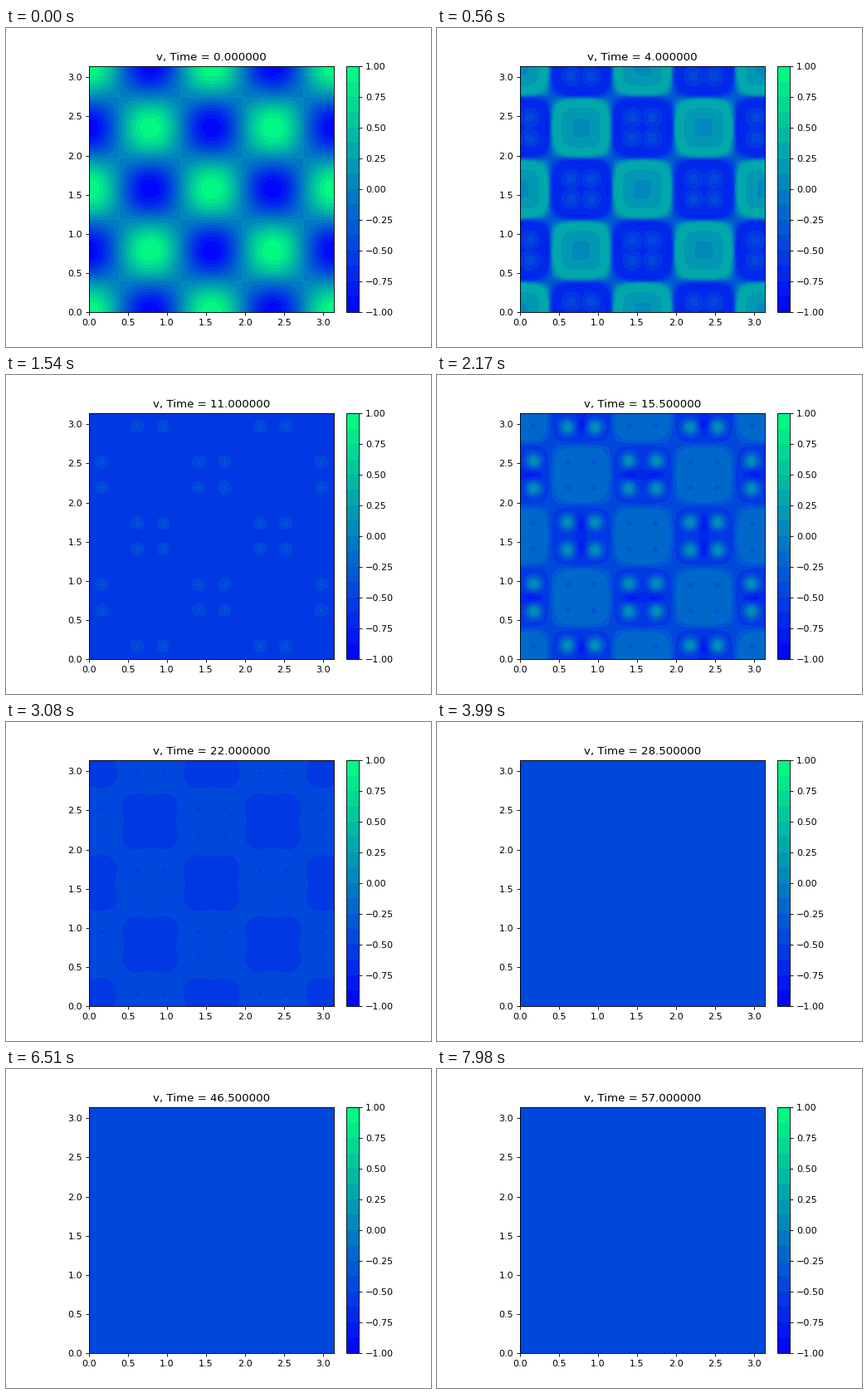
Recreate the animation shown at these times as a matplotlib script. Size 512 by 384 pixels, loop 8000 ms.

```python
import numpy as np
import matplotlib.pyplot as plt
from matplotlib.animation import FuncAnimation
from mpl_toolkits.axes_grid1 import make_axes_locatable

plt.rcParams["font.family"] = "DejaVu Sans"

LOOP, TICK, STEP = 8000, 20, 70      # ms
DT = 0.5                             # simulated time per step
LEVELS = np.linspace(-1, 1, 17)

x = np.linspace(0, np.pi, 301)
X, Y = np.meshgrid(x, x)
C = np.cos(4 * X) * np.cos(4 * Y)    # > 0 in "high" cells, < 0 in "low" cells


def local(s):
    """Offset from the nearest cell centre, -1 to 1 across the cell."""
    return ((s * 4 / np.pi + 0.5) % 1 - 0.5) * 2


def bell(d, width):
    return np.exp(-(d / width) ** 2 / 2)


def ramp(s, lo, hi):
    s = np.clip((s - lo) / (hi - lo), 0, 1)
    return s * s * (3 - 2 * s)


def mix(low, high, m):
    return low + (high - low) * m


PX, PY = np.abs(local(X)), np.abs(local(Y))
SQUARE = (PX ** 4 + PY ** 4) ** 0.25
NODE = (np.sin(4 * X) * np.sin(4 * Y)) ** 2


def spots(at, width):
    return bell(PX - at, width) * bell(PY - at, width)


def squares():
    high = 0.09 + 0.38 * np.minimum(SQUARE, 0.95) ** 2
    low = -0.67 + 0.24 * spots(0.33, 0.17) - 0.12 * ramp(SQUARE, 0.6, 0.95)
    edge = 0.5 + 0.5 * np.tanh((C - 0.05) / 0.12)
    return mix(low, high, edge) + 0.1 * NODE ** 3


def reversed_squares():
    high = -0.85 - 0.04 * bell(PX + PY - 0.58, 0.05)
    low = -0.2 + 0.13 * spots(0.38, 0.13) - 0.09 * bell(PX + PY, 0.17)
    return mix(low, high, ramp(C, -0.5, 0.05)) + 0.17 * NODE ** 2


def crossing():
    low = -0.62 + 0.25 * spots(0.42, 0.17)
    return mix(low, -0.52, ramp(C, -0.3, 0.2))


def four_spots():
    d = np.hypot(PX - 0.42, PY - 0.42)
    high = -0.23 + 0.07 * bell(d - 0.27, 0.08) - 0.05 * bell(d, 0.12)
    # dark bars lie sideways in every second column of low cells
    even = np.floor(X * 4 / np.pi + 0.5) % 2 == 0
    along, across = np.where(even, PX, PY), np.where(even, PY, PX)
    bars = bell(along - 0.4, 0.2) * bell(across, 0.12)
    low = (-0.58 + 0.72 * spots(0.45, 0.17) - 0.25 * bars
           - 0.06 * bell(np.hypot(PX, PY), 0.25))
    return mix(low, high, ramp(C, -0.2, 0.25))


def clovers():
    def lobes(p):
        return bell(p - 0.47, 0.35) + bell(p + 0.47, 0.35)
    g = lobes(PX) * lobes(PY) * ramp(C, 0, 0.08)
    dots = spots(0.42, 0.08) * (C < 0)
    return -0.5 - 0.08 * (g - 0.433) - 0.05 * dots


def rest():
    return mix(-0.465, -0.497, ramp(C, -0.1, 0.3))


TIMES = np.array([0, 4, 7, 11, 15.5, 22, 24])
KEYS = np.array([C, squares(), reversed_squares(), crossing(),
                 four_spots(), clovers(), rest()])
SLOPES = np.gradient(KEYS, TIMES, axis=0)
SLOPES[-1] = 0


def field(t):
    """Cubic Hermite path through the key states."""
    if t >= TIMES[-1]:
        return KEYS[-1]
    k = np.searchsorted(TIMES, t, side="right") - 1
    h = TIMES[k + 1] - TIMES[k]
    s = (t - TIMES[k]) / h
    v = ((1 + 2 * s) * (1 - s) ** 2 * KEYS[k]
         + s * s * (3 - 2 * s) * KEYS[k + 1]
         + h * s * (1 - s) ** 2 * SLOPES[k]
         + h * s * s * (s - 1) * SLOPES[k + 1])
    return np.clip(v, -0.999, 0.999)


def plot(t):
    return ax.contourf(X, Y, field(t), levels=LEVELS, cmap="winter")


fig, ax = plt.subplots(figsize=(6.4, 4.8), dpi=80)
ax.set_aspect("equal")
cax = make_axes_locatable(ax).append_axes("right", size="5%", pad="5%")
now = {"step": 0, "fill": plot(0)}
fig.colorbar(now["fill"], cax=cax)
title = ax.set_title("v, Time = 0.000000")


def show(step):
    if step == now["step"]:
        return
    t = step * DT
    title.set_text(f"v, Time = {t:f}")
    if min(t, TIMES[-1]) != min(now["step"] * DT, TIMES[-1]):
        now["fill"].remove()
        now["fill"] = plot(t)
    now["step"] = step


def init():
    show(0)
    return []


def update(i):
    show((i * TICK + TICK // 2) // STEP)
    return []


anim = FuncAnimation(fig, update, frames=LOOP // TICK, interval=TICK,
                     init_func=init, repeat=True, repeat_delay=0, blit=False)
plt.show()
```
